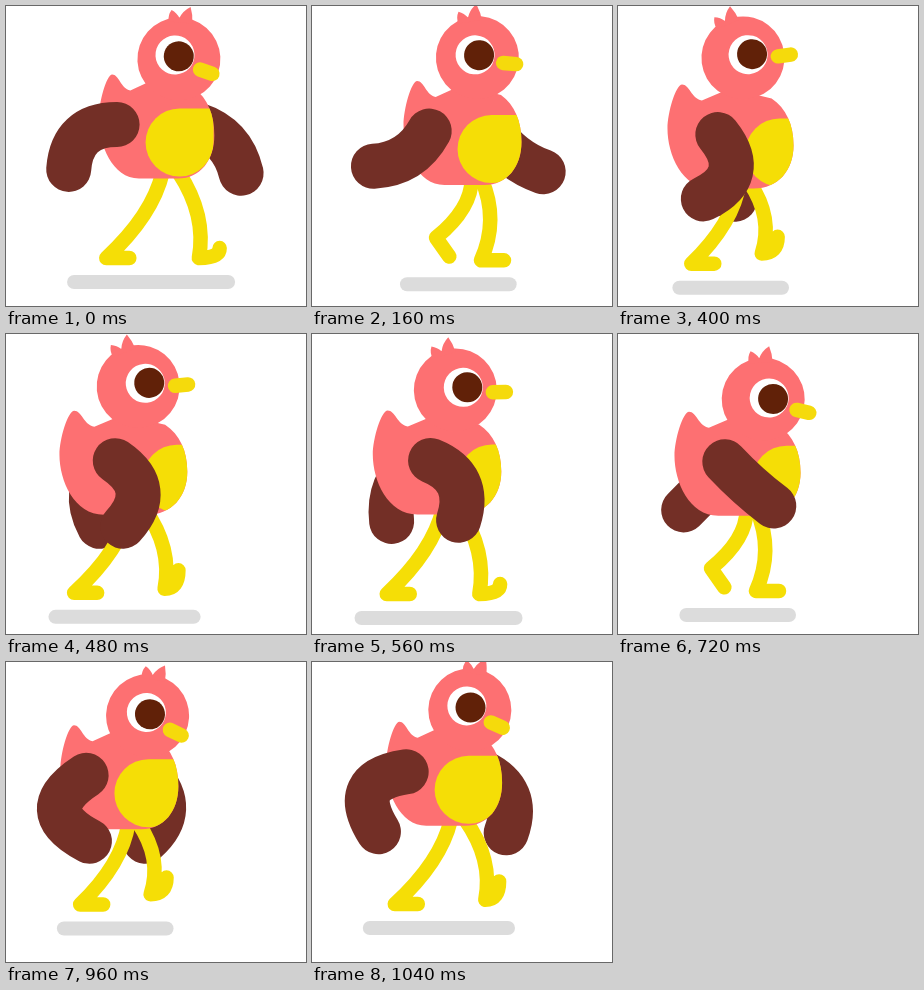
These frames come from a looping animation (300x300 px, 1120 ms). An HTML page:

```html
<!DOCTYPE html>
<html lang="en">
<head>
<meta charset="utf-8">
<title>Walking bird</title>
<style>
html, body { margin: 0; width: 100%; height: 100%; overflow: hidden; background: #fff; }
svg { display: block; width: 100vw; height: 100vh; }
.pink { fill: #fd7072; }
.yellow { fill: #f5de06; }
.line { fill: none; stroke-linecap: round; stroke-linejoin: round; }
.wing { stroke: #732f26; stroke-width: 45px; }
.leg { stroke: #f5de06; stroke-width: 14.5px; }
.beak { stroke: #f5da0c; stroke-width: 14.5px; }
.shadow { stroke: #dcdcdc; stroke-width: 14px; }
</style>
</head>
<body>
<svg viewBox="0 0 300 300">
  <clipPath id="torso"><path id="clip"/></clipPath>
  <path id="shadow" class="line shadow"/>
  <path id="farWing" class="line wing"/>
  <path id="legA" class="line leg"/>
  <path id="legB" class="line leg"/>
  <path id="body" class="pink"/>
  <path id="belly" class="yellow" clip-path="url(#torso)"/>
  <g id="head" class="pink">
    <circle r="41.5"/>
    <path d="M-22-32Q-25-38-23-44Q-17-43-13-39Q-12-47-6-53Q-1-46 1-38Z"/>
    <g id="eye">
      <circle r="19.5" fill="#fff"/>
      <circle cx="4" r="15" fill="#612108"/>
    </g>
    <path id="beak" class="line beak" d="M-6.5 0H6.5"/>
  </g>
  <path id="nearWing" class="line wing"/>
</svg>
<script>
const LOOP = 1120, STEP = 80;

// Height of the ground as the view drifts: time, y.
const ground = [[0, 276], [560, 284], [720, 281], [880, 267], [1040, 266], [LOOP, 276]];

const el = id => document.getElementById(id);
const setPath = (id, d) => el(id).setAttribute("d", d);
const place = (id, x, y, angle = 0) =>
  el(id).setAttribute("transform", `translate(${x} ${y}) rotate(${angle})`);

// Angles are in degrees.
const cos = a => Math.cos(a * Math.PI / 180);
const sin = a => Math.sin(a * Math.PI / 180);

function between(keys, t) {
  const i = keys.findIndex(k => k[0] > t);
  const [t0, v0] = keys[i - 1], [t1, v1] = keys[i];
  return v0 + (v1 - v0) * (t - t0) / (t1 - t0);
}

function bodyPath(left, bottom, width) {
  const p = (x, y) => `${left + x * width / 121} ${bottom + y} `;
  return "M" + p(14, -104) +
    "C" + p(21, -104) + p(23, -90) + p(33, -88) +
    "L" + p(60, -100) + "L" + p(100, -90) +
    "C" + p(114, -80) + p(121, -64) + p(121, -43) +
    "C" + p(121, -18) + p(106, 0) + p(83, 0) +
    "L" + p(42, 0) +
    "C" + p(14, 0) + p(0, -34) + p(0, -60) +
    "C" + p(0, -76) + p(8, -104) + p(14, -104) + "Z";
}

// A pendulum of fixed length, bowed sideways by bend.
function wingPath(x, y, swing, bend) {
  const length = 66, dx = sin(swing), dy = cos(swing);
  const bx = x + dx * length / 2 - dy * bend;
  const by = y + dy * length / 2 + dx * bend;
  return `M${x} ${y}Q${bx} ${by} ${x + dx * length} ${y + dy * length}`;
}

// The foot swings forward in the first half of its phase, then pushes back.
function legPath(mid, bottom, floor, phase) {
  const x = mid + 14 - 8 * cos(phase), y = bottom - 6;
  const lift = 21 * Math.max(0, sin(phase) + 0.3 * sin(2 * phase));
  const ax = mid - 4 - 47 * cos(phase + 10), ay = floor - 24 - lift;
  const pitch = 55 * sin(360 * Math.min(1, phase / 195));
  const tx = ax + 23 * cos(pitch), ty = ay + 23 * sin(pitch);
  const kneeX = (x + ax) / 2 + 18, kneeY = (y + ay) / 2;
  return `M${x} ${y}Q${kneeX} ${kneeY} ${ax} ${ay}` +
    (ty < ay ? `Q${tx} ${ay} ${tx} ${ty}` : `L${tx} ${ty}`);
}

function draw(t) {
  const phase = 360 * t / LOOP;
  const turn = cos(phase);          // 1 faces the viewer, -1 faces away
  const stride = cos(2 * phase);    // 1 with legs apart, -1 with legs together
  const floor = between(ground, t);
  const mid = 126.5 + 16 * cos(phase - 37) + 16 * cos(2 * phase - 45);
  const bottom = floor - 100 - 3.5 * stride;
  const width = 122 - 6.5 * turn;

  const shadowX = mid - 2 - 3.5 * turn, reach = 56 + 21 * stride;
  setPath("shadow", `M${shadowX - reach} ${floor}H${shadowX + reach}`);

  const torso = bodyPath(mid - width / 2, bottom, width);
  setPath("body", torso);
  setPath("clip", torso);

  const r = 34, x = mid + 39 - 16 * turn, y = bottom - 36;
  setPath("belly", `M${x} ${y - r}H${x + r}V${y}A${r} ${r} 0 0 1 ${x - r} ${y}A${r} ${r} 0 0 1 ${x} ${y - r}Z`);

  const nod = sin(phase);
  place("head", mid + 20.3 + 2 * turn - 8.5 * nod, bottom - 122 + 2.5 * turn - 9 * nod,
    9 + 16.5 * cos(phase + 52));
  place("eye", 1.5 - 6.5 * turn, -2.5);
  place("beak", 37 - 7 * turn, 3);

  const swing = -6 + 53 * cos(phase - 227) - 5 * stride;
  const bend = 49 * cos(phase + 51) - 8 * sin(2 * phase);
  const shoulder = bottom - 54;
  setPath("nearWing", wingPath(mid - 23 - 16.5 * turn, shoulder, swing, bend));
  setPath("farWing", wingPath(mid + 10 + 30 * turn, shoulder, -0.9 * swing, -0.6 * bend));

  setPath("legA", legPath(mid, bottom, floor, phase));
  setPath("legB", legPath(mid, bottom, floor, (phase + 180) % 360));
}

const start = performance.now();
function tick() {
  const t = (performance.now() - start) % LOOP;
  draw(Math.floor(t / STEP) * STEP);
  requestAnimationFrame(tick);
}
tick();
</script>
</body>
</html>
```
